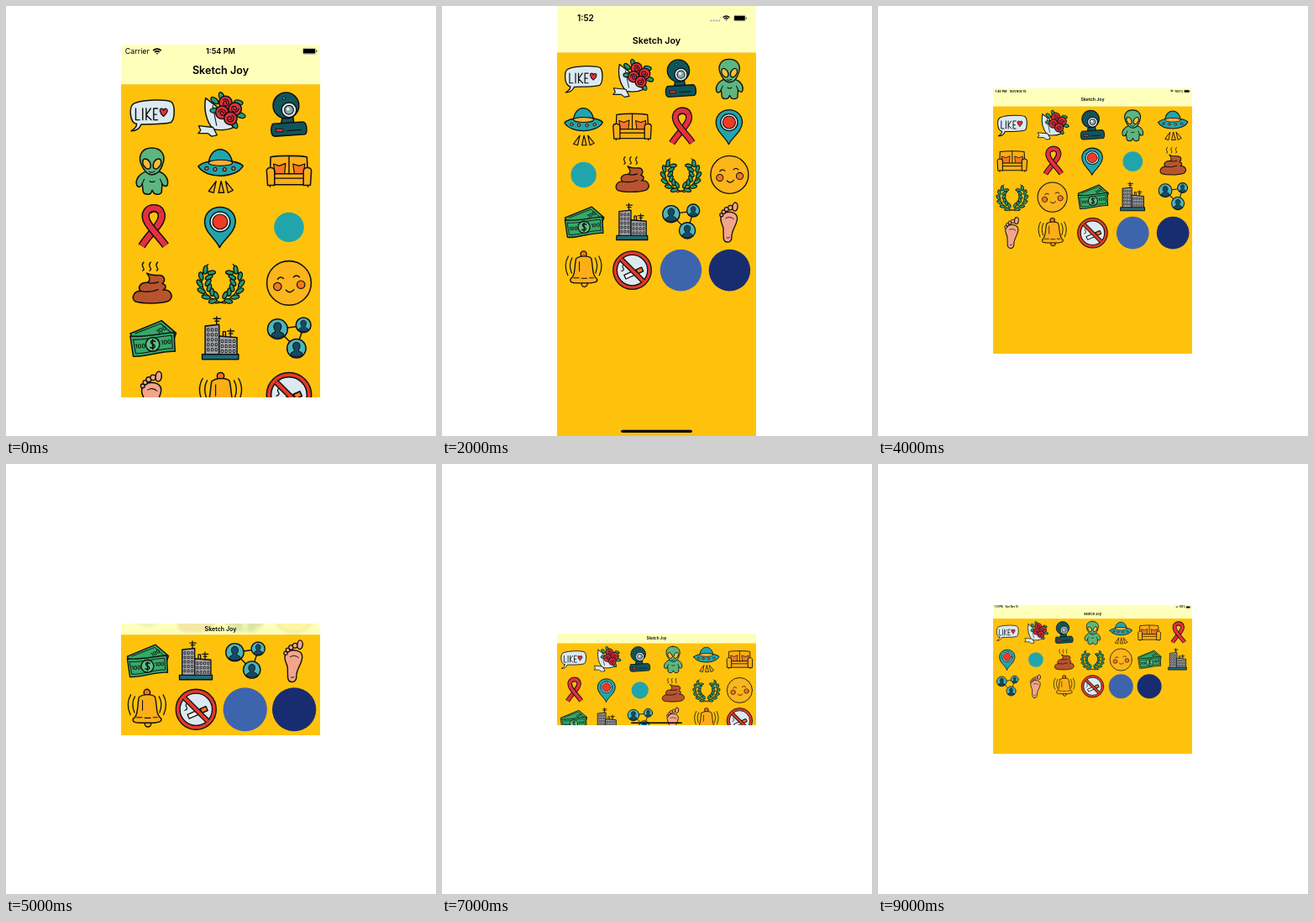
Write an HTML page with a canvas that moves like this. It is 512x512 px and loops after 10 s.

```html
<!DOCTYPE html>
<html lang="en">
<head>
<meta charset="utf-8">
<title>Sketch Joy</title>
<style>
  html, body { margin: 0; width: 100%; height: 100%; overflow: hidden; background: #fff; }
  canvas { display: block; width: 512px; height: 512px; }
</style>
</head>
<body>
<canvas id="stage"></canvas>
<script>
const canvas = document.getElementById('stage');
const g = canvas.getContext('2d');
const dpr = window.devicePixelRatio || 1;
canvas.width = canvas.height = 512 * dpr;

const TITLE = 'Sketch Joy';
const SANS = 'Inter, "Open Sans", sans-serif';
const LEFT = 137, WIDTH = 237, STEP = 1000;
const INK = '#111', RED = '#e52f3f', TEAL = '#21a5ad', DARK = '#10555a', PALE = '#dbeaf0',
      GREEN = '#5cb67f', LEAF = '#239b72', GOLD = '#fcae17', ORANGE = '#f47721';

// ---- Drawing helpers; icons live in a 100 x 100 box around the origin ----
function paint(path, fill, line) {
  if (fill) { g.fillStyle = fill; g.fill(path); }
  if (line) { g.strokeStyle = INK; g.lineWidth = line; g.stroke(path); }
}
const shape = (d, fill, line = 2.6) => paint(new Path2D(d), fill, line);
const ink = (d, line = 2.4) => shape(d, null, line);
function oval(x, y, rx, ry, turn, fill, line = 2.6) {
  const p = new Path2D();
  p.ellipse(x, y, rx, ry, turn, 0, 7);
  paint(p, fill, line);
}
const disc = (x, y, r, fill, line) => oval(x, y, r, r, 0, fill, line);
function band(d, color, width) {
  const p = new Path2D(d);
  g.lineCap = 'butt';
  paint(p, null, width + 5);
  g.strokeStyle = color;
  g.lineWidth = width;
  g.stroke(p);
  g.lineCap = 'round';
}
function at(x, y, turn, draw) {
  g.save();
  g.translate(x, y);
  g.rotate(turn);
  draw();
  g.restore();
}
function label(text, x, y, size, weight = 400, align = 'center', color = '#000') {
  g.font = `${weight} ${size}px ${SANS}`;
  g.textAlign = align;
  g.textBaseline = 'middle';
  g.fillStyle = color;
  g.fillText(text, x, y);
}

// ---- Icons ----
function like() {
  shape('M-31 17C-46 15-47-18-37-24C-18-32 28-33 39-27C47-18 45 9 38 14C20 19 0 17-22 18C-25 26-33 32-42 31C-34 27-31 23-31 17Z', PALE);
  ink('M-33-14V9H-25M-19-14V9M-12-14V9M-3-14L-12-1L-2 9M11-14H3V9H11M3-2H9', 2.4);
  shape('M23 2C14-5 14-14 19-14C22-14 23-12 23-10C24-13 27-15 29-13C33-10 29-3 23 2Z', RED, 2);
}

function bouquet() {
  shape('M-30-35L-8-18L26 24C14 30-4 30-15 28C-30 10-34-14-30-35Z', PALE);
  ink('M-16-20L-8 20', 1.8);
  shape('M-15 24L-44 21L-40 30L-45 36L-26 36L-18 42L-7 40Z', PALE, 2.2);
  for (const [x, y, a] of [[-12, -30, .7], [2, -38, 1.2], [36, -26, .2], [41, 0, .3], [28, 18, 1], [-12, -10, 0]])
    oval(x, y, 9, 5, a, LEAF, 2.2);
  for (const [x, y] of [[10, -26], [3, -6], [29, -13], [20, 6]]) {
    disc(x, y, 13, RED);
    at(x, y, x / 9, () => ink('M-7 2C-8-8 7-9 7 0C7 7-3 7-3 1C-3-3 3-3 3 1', 2));
  }
}

function webcam() {
  shape('M-13 2L-16 18H10L8 2Z', DARK);
  shape('M-32 17L28 13C37 14 37 36 32 38L-28 42C-38 42-37 22-32 17Z', DARK);
  disc(-6, -20, 26, DARK);
  disc(0, -11, 15, PALE);
  disc(0, -11, 9, '#8ca8ad', 2);
  disc(-2, -13, 3, '#fff', 0);
  disc(-10, -35, 3, TEAL, 1.5);
  shape('M-26 27H-12V33H-26Z', RED, 1.6);
  ink('M-4 31L24 29', 2);
}

function alien() {
  shape('M-12 0C-28 6-34 18-31 28C-28 34-21 31-20 25L-18 42C-15 48-4 47-2 43L0 38L3 43C5 48 17 47 19 42L20 25C24 32 30 31 31 26C33 14 25 4 12 0Z', GREEN);
  shape('M-1-47C-21-47-29-31-22-14C-16 0-8 7-1 7C8 7 17 0 21-14C28-31 20-47-1-47Z', GREEN);
  oval(-11, -15, 7, 11, -.5, '#fdbe35');
  oval(10, -15, 7, 11, .5, '#fdbe35');
  ink('M-6 1Q0 4 5 0M-20 25L-16 16M20 25L16 16M-5 20Q0 23 5 20', 2);
}

function ufo() {
  shape('M-24-15C-22-54 20-54 24-15C10-8-12-8-24-15Z', TEAL);
  shape('M-45-10C-32-25 34-25 45-11C32 15-30 16-45-10Z', TEAL);
  oval(0, -17, 24, 6, 0, '#f8b136', 2);
  for (const x of [-28, -11, 8, 26]) disc(x, -3 - Math.abs(x) / 9, 3.5, ORANGE, 1.8);
  shape('M-9 20L-24 40L-14 43ZM1 20L-4 43H7ZM10 20L15 43L25 38Z', GOLD, 2.3);
}

function sofa() {
  shape('M-37-29C-20-32 20-32 36-29L38 6H-38Z', GOLD);
  shape('M-31-15L-20-11L-7-16L-9 6H-28Z', ORANGE, 2);
  shape('M8-15L20-11L32-15L29 6H11Z', ORANGE, 2);
  shape('M-31 5H31V27H-31Z', GOLD);
  ink('M0-30V5M-31 14H31');
  shape('M-45-2C-43-10-29-9-29 0V28H-43ZM45-2C43-10 29-9 29 0V28H43Z', GOLD);
  ink('M-38 28V31M38 28V31');
}

function ribbon() {
  band('M-21 38C-6 12 28-12 17-31C12-41-6-41-9-30', RED, 11);
  band('M27 37C10 12-22-12-11-31C-5-41 12-41 17-31', RED, 11);
}

function pin() {
  shape('M-2 41C-10 22-32 12-32-11C-31-50 29-50 30-11C29 12 6 24-2 41Z', TEAL);
  disc(-1, -11, 20, PALE);
  disc(-1, -11, 15, '#ef3b25', 2);
}

function pile() {
  shape('M-11-20C-3-16 3-15 12-16C25-17 28-5 20 1C30 4 28 11 22 14C37 12 45 27 33 36C15 42-18 42-34 37C-44 29-35 15-23 16C-31 7-22-2-10-1C-3-4-4-12-11-20Z', '#b8542d');
  ink('M-10-1Q2 2 12-2M-23 16Q-4 20 12 13');
  for (const x of [-19, -5, 9]) ink(`M${x}-25C${x + 8}-29 ${x - 7}-34 ${x + 2}-42`, 2.4);
}

function laurel() {
  for (const side of [-1, 1]) {
    g.save();
    g.scale(side, 1);
    ink('M10 41C-46 32-46-18-25-38', 2);
    for (let i = 0; i < 6; i++) {
      const a = 1.95 + i * .39, x = Math.cos(a), y = Math.sin(a);
      oval(x * 42, y * 39, 8.5, 4.2, a + .95, LEAF, 2.2);
      oval(x * 25, y * 28 - 2, 8, 4, a + 2.25, LEAF, 2.2);
    }
    g.restore();
  }
}

function face() {
  disc(0, 0, 44.5, '#fcb51b');
  disc(-23, 7, 8, ORANGE, 2);
  disc(24, 3, 8, ORANGE, 2);
  ink('M-23-8Q-17-15-11-9M9-12Q15-18 21-12M-6 14Q2 23 10 13', 2.4);
}

function money() {
  shape('M-44-11L19-37L48-12L38 18L-28 22Z', '#36a968');
  ink('M-34-11L17-31L40-11', 1.7);
  at(19, -18, -.5, () => label('100', 0, 0, 12, 600, 'center', INK));
  shape('M-44-6C-18-2 18-12 44-13L46 25C18 23-12 37-38 35Z', '#36a968');
  ink('M-38 1C-16 3 18-6 39-7L41 19C18 18-10 30-33 29Z', 1.7);
  disc(1, 11, 14, '#5fbf86');
  ink('M6 5C0 0-6 6 0 10C9 13 6 21-4 17M1 1V21', 2.6);
  at(-24, 15, -.06, () => label('100', 0, 0, 12, 600, 'center', INK));
  at(28, 7, -.1, () => label('100', 0, 0, 12, 600, 'center', INK));
}

function city() {
  shape('M-31-26L-3-29V34H-31Z', '#a0a0a5');
  shape('M-3-6L33-3V34H-3Z', '#a0a0a5');
  for (let r = 0; r < 5; r++)
    for (let c = 0; c < 3; c++) shape(`M${-26 + c * 8} ${-21 + r * 10}h3v5h-3z`, PALE, 1.6);
  for (let r = 0; r < 3; r++)
    for (let c = 0; c < 4; c++) shape(`M${2 + c * 8} ${2 + r * 10}h3v5h-3z`, PALE, 1.6);
  shape('M-37 31H36V41H-37Z', '#216c78');
  ink('M-8-29V-45M-14-41H0M-11-36H-3M20-4V-20M14-16H27M17-11H24M5-6V-15H10V-6', 2.4);
}

function network() {
  ink('M-23-20L30-27M-23-19L15 19M30-27L15 19', 2.6);
  for (const [x, y, r] of [[-23, -20, 20], [29, -28, 15], [15, 19, 19]]) {
    disc(x, y, r, '#4bb4bb');
    at(x, y, 0, () => {
      g.scale(r / 20, r / 20);
      shape('M-13 14C-12 6-5 8-4 4C-10-3-8-13 0-13C8-13 10-3 4 4C5 8 13 6 13 14Q0 22-13 14Z', '#154a62', 1.8);
    });
  }
}

function foot() {
  const skin = '#f3a58b';
  shape('M-6 46C-18 46-13 28-15 12C-18 2-25-8-18-18C-6-30 19-25 18-9C17 7 4 18 5 34C6 42 0 47-6 46Z', skin);
  for (const [x, y, r] of [[-19, -18, 4], [-14, -25, 4.5], [-7, -31, 5], [2, -35, 5.5]]) disc(x, y, r, skin, 2.3);
  oval(13, -37, 6, 10, .1, skin);
  ink('M-9-10Q1-16 10-8M-7 36Q-3 38 0 35', 1.8);
}

function bell() {
  disc(2, 32, 7, GOLD);
  disc(0, -38, 7, ORANGE);
  shape('M-18-27C-10-35 12-35 18-28C23-9 19 13 32 21C33 29 24 29 16 30H-17C-27 30-33 28-31 21C-19 14-22-8-18-27Z', GOLD);
  ink('M-23 18H-11M-5 19H8M14 18H23M-10-20V2', 2);
  for (const s of [-1, 1])
    ink(`M${s * 27}-29Q${s * 36}-13 ${s * 28} 7M${s * 36}-33Q${s * 48}-12 ${s * 37} 12`);
}

function noSmoking() {
  disc(0, 0, 45, '#e53a28');
  disc(0, 0, 36, PALE);
  at(3, 7, -.42, () => {
    shape('M-22-5H22V5H-22Z', '#fff');
    shape('M9-5H23V5H9Z', ORANGE);
  });
  ink('M-25 2C-12-2-30-8-19-14C-13-18-15-20-18-22', 2.2);
  band('M-26-26L26 26', '#e53a28', 7);
}

const plain = (color, r) => () => disc(0, 0, r, color, 0);

const icons = [like, bouquet, webcam, alien, ufo, sofa, ribbon, pin, plain(TEAL, 30), pile,
  laurel, face, money, city, network, foot, bell, noSmoking, plain('#3c65ae', 49), plain('#182d70', 49)];

// ---- Screens, sized in points ----
const phone = { bar: 20, nav: 44, item: 80, cols: 4 };
const wide = { bar: 0, nav: 32, item: 128, cols: 4, end: true };
const pad = { bar: 20, nav: 50, item: 128, date: 'Sun Nov 15' };
const tall = { ...phone, bar: 44 };
const long = { w: 896, h: 414, bar: 0, nav: 44, item: 128, cols: 6, home: 231 };
const screens = [
  { ...phone, w: 320, h: 568, cols: 3, time: '1:54 PM' },
  { ...phone, w: 375, h: 667, time: '1:50 PM' },
  { ...tall, w: 375, h: 812, time: '1:52', home: 134 },
  { ...tall, w: 414, h: 896, time: '1:53', home: 148 },
  { ...pad, w: 768, h: 1024, cols: 5, time: '1:49 PM' },
  { ...wide, w: 568, h: 320 },
  { ...wide, w: 667, h: 375 },
  long,
  long,
  { ...pad, w: 1024, h: 768, cols: 7, time: '1:51 PM' }
];

function wifi(x, y, s) {
  g.strokeStyle = '#000';
  g.lineCap = 'butt';
  g.lineWidth = 2.4 * s;
  for (const r of [1.3, 5.2, 9.1]) {
    g.beginPath();
    g.arc(x, y + 5 * s, r * s, -2.36, -.78);
    g.stroke();
  }
  g.lineCap = 'round';
}

function battery(x, y, w, h) {
  g.strokeStyle = '#777';
  g.lineWidth = .7;
  g.beginPath();
  g.roundRect(x, y - h / 2, w, h, h / 4);
  g.stroke();
  g.fillStyle = '#000';
  g.beginPath();
  g.roundRect(x + 1, y - h / 2 + 1, w - 2, h - 2, h / 8);
  g.fill();
  g.fillRect(x + w + .9, y - 1.6, 1.1, 3.2);
}

function status({ w, bar, time, date }) {
  if (!bar) return;
  if (date) {
    label(time, 7, 11, 12, 600, 'left');
    label(date, 64, 11, 12, 600, 'left');
    wifi(w - 78, 11, .9);
    label('100%', w - 34, 11, 12, 600, 'right');
    battery(w - 31, 11, 21, 10);
  } else if (bar === 44) {
    label(time, w * .143, 24, 16, 600);
    g.fillStyle = '#aaa';
    for (let i = 0; i < 4; i++) g.fillRect(w * .77 + i * 5, 26, 3, 3);
    wifi(w * .85, 23, .95);
    battery(w * .888, 23, 22, 10.5);
  } else {
    label('Carrier', 6.5, 11, 12, 400, 'left');
    wifi(58, 11, 1);
    label(time, w / 2, 11, 12.3, 600);
    battery(w - 28, 10.5, 21, 9.5);
  }
}

function drawIcons({ w, h, bar, nav, item, cols, end }) {
  const edge = 10 + item / 2;
  const gap = (w - 2 * edge) / (cols - 1);
  const pitch = item + 10;
  const rows = Math.ceil(icons.length / cols);
  const top = end ? h - edge - (rows - 1) * pitch : bar + nav + edge;
  icons.forEach((draw, i) => {
    g.save();
    g.translate(edge + i % cols * gap, top + Math.floor(i / cols) * pitch);
    g.scale(item / 100, item / 100);
    draw();
    g.restore();
  });
}

function render(screen) {
  const { w, h, bar, nav, home, end } = screen;
  const k = WIDTH / w, head = bar + nav, height = Math.floor(h * k);
  g.setTransform(dpr, 0, 0, dpr, 0, 0);
  g.fillStyle = '#fff';
  g.fillRect(0, 0, 512, 512);
  g.save();
  g.translate(LEFT, Math.ceil(256 - height / 2));
  g.scale(k, height / h);
  g.lineCap = g.lineJoin = 'round';
  g.beginPath();
  g.rect(0, 0, w, h);
  g.clip();
  g.fillStyle = '#ffc20c';
  g.fillRect(0, 0, w, h);
  drawIcons(screen);

  g.fillStyle = '#ffffbc';
  g.fillRect(0, 0, w, head);
  if (end) {
    // Soft show-through of scrolled icons beneath the bar
    g.save();
    g.beginPath();
    g.rect(0, 0, w, head);
    g.clip();
    g.globalAlpha = .13;
    g.filter = `blur(${2 * dpr}px)`;
    drawIcons(screen);
    g.restore();
  }
  g.fillStyle = 'rgba(0,0,0,.13)';
  g.fillRect(0, head, w, .5);
  label(TITLE, w / 2, bar + nav / 2, 17, 600);
  status(screen);
  if (home) {
    g.fillStyle = '#000';
    g.beginPath();
    g.roundRect((w - home) / 2, h - 13, home, 5, 2.5);
    g.fill();
  }
  g.restore();
}

let shown = null;
const start = performance.now();
function tick() {
  const time = performance.now() - start;
  const screen = screens[Math.floor(time / STEP) % screens.length];
  if (screen !== shown) render(shown = screen);
  requestAnimationFrame(tick);
}
tick();
</script>
</body>
</html>
```
